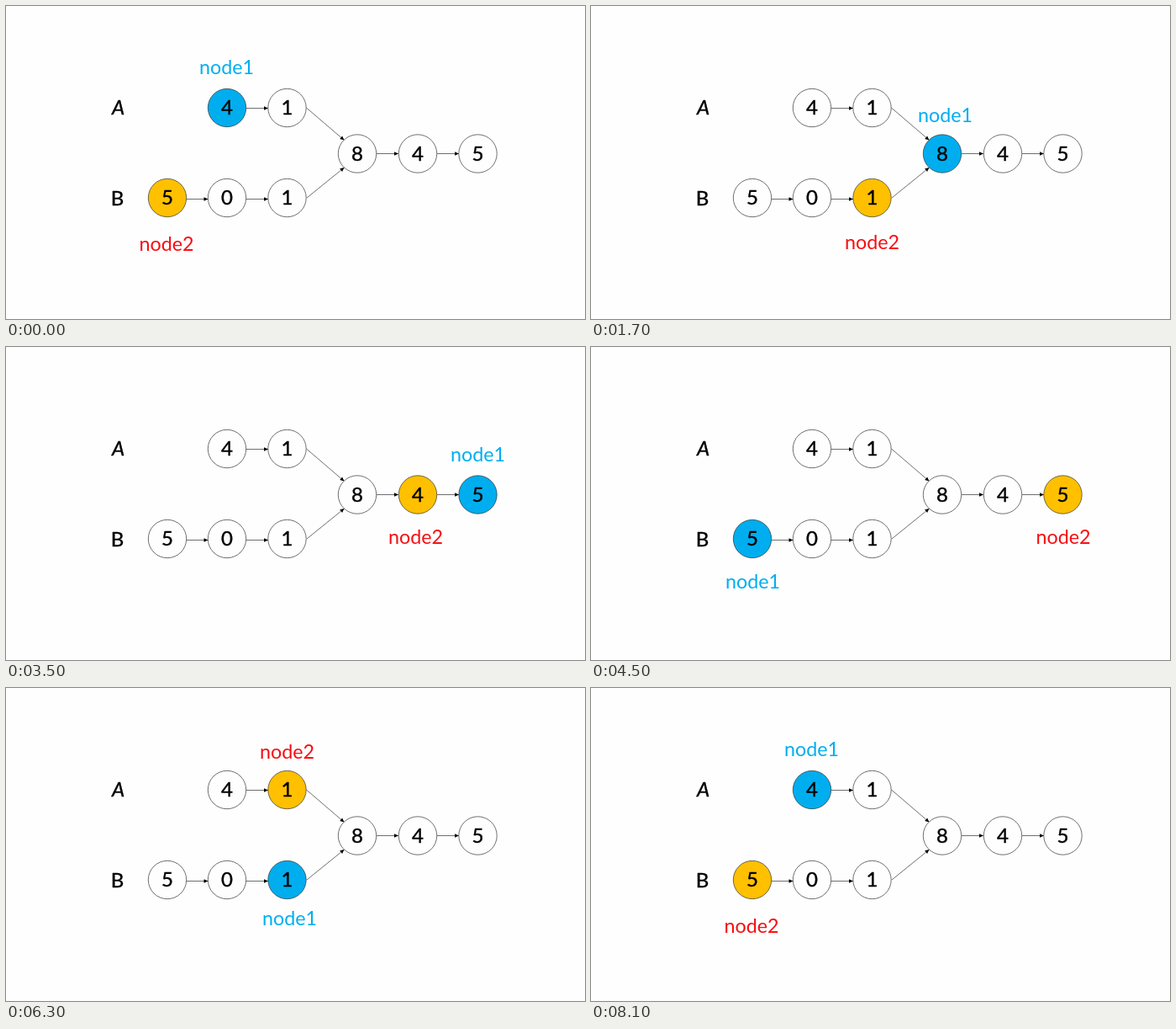
Write an HTML page that moves like this. It is 689 px wide and 372 px high and loops after 8.7 s.

```html
<!DOCTYPE html>
<html lang="en">
<head>
<meta charset="utf-8">
<title>Linked list intersection</title>
<style>
html, body { margin: 0; width: 100%; height: 100%; overflow: hidden; background: #fefefe; }
svg { display: block; width: 100vw; height: 100vh; }
text { font-family: "Comic Sans MS", Lato, "Open Sans", sans-serif; font-size: 24px; text-anchor: middle; stroke-linejoin: round; }
.ink { stroke: #000; stroke-width: .4; }
.label { font-size: 23.3px; }
circle, line { stroke: #333; stroke-width: .7; }
</style>
</head>
<body>
<svg id="stage" viewBox="0 0 689 372"></svg>
<script>
const BLUE = '#00aeef', ORANGE = '#ffc000', RED = '#f80d12', WHITE = '#fefefe';
const stage = document.getElementById('stage');

function add(tag, attrs, text) {
  const el = document.createElementNS('http://www.w3.org/2000/svg', tag);
  for (const k in attrs) el.setAttribute(k, attrs[k]);
  if (text) el.textContent = text;
  return stage.appendChild(el);
}

function arrow(x1, y1, x2, y2) {
  const deg = Math.atan2(y2 - y1, x2 - x1) * 180 / Math.PI;
  add('line', { x1, y1, x2, y2 });
  add('path', { d: 'M0 0L-5 -2.3V2.3Z', fill: '#000', transform: `translate(${x2} ${y2}) rotate(${deg})` });
}

arrow(286, 121.5, 312, 121.5);
arrow(357.5, 121, 402.5, 159.5);
arrow(358, 228, 402.5, 192);
arrow(441, 175.5, 467, 175.5);
arrow(513, 175.5, 539, 175.5);
arrow(215, 229.5, 240.5, 229.5);
arrow(286, 229.5, 312, 229.5);

const nodes = {};
function node(id, cx, cy, digit) {
  nodes[id] = add('circle', { cx, cy, r: 22.7, fill: WHITE });
  add('text', { x: cx, y: cy + 8, class: 'ink' }, digit);
}
node('a4', 263, 121, '4');
node('a1', 334.5, 121, '1');
node('b5', 192, 228, '5');
node('b0', 263, 228, '0');
node('b1', 334.5, 228, '1');
node('c8', 418, 175.5, '8');
node('c4', 490, 175.5, '4');
node('c5', 561.5, 175.5, '5');

add('text', { x: 133.5, y: 129, class: 'ink', 'font-style': 'italic' }, 'A');
add('text', { x: 132.5, y: 236.5, class: 'ink' }, 'B');

const label1 = add('text', { class: 'label', fill: BLUE }, 'node1');
const label2 = add('text', { class: 'label', fill: RED }, 'node2');

// start time, then node and label centre for each pointer
const steps = [
  [0,    'a4', 262.5, 73,  'b5', 191, 283],
  [800,  'a1', 334.5, 73,  'b0', 260.5, 281],
  [1700, 'c8', 421.5, 130, 'b1', 334.5, 281],
  [2600, 'c4', 497, 128,   'c8', 416, 226],
  [3500, 'c5', 561.5, 128, 'c4', 487.5, 226],
  [4500, 'b5', 192.5, 279, 'c5', 562, 226],
  [5400, 'b0', 263, 274,   'a4', 263, 75],
  [6300, 'b1', 337.5, 274, 'a1', 334.5, 76],
  [7200, 'c8', 421.5, 130, 'c8', 416, 226],
  [8100, 'a4', 262.5, 73,  'b5', 191, 283]
];
const LOOP = 8700;

function place(label, x, y) {
  label.setAttribute('x', x);
  label.setAttribute('y', y + 7.8);
}

let shown = null;
function draw(t) {
  const step = steps.filter(s => s[0] <= t).pop();
  if (step === shown) return;
  shown = step;
  const [, n1, x1, y1, n2, x2, y2] = step;
  for (const id in nodes) {
    nodes[id].setAttribute('fill', id === n1 ? BLUE : id === n2 ? ORANGE : WHITE);
  }
  place(label1, x1, y1);
  place(label2, x2, y2);
}

const start = performance.now();
function tick() {
  draw((performance.now() - start) % LOOP);
  requestAnimationFrame(tick);
}
tick();
</script>
</body>
</html>
```
